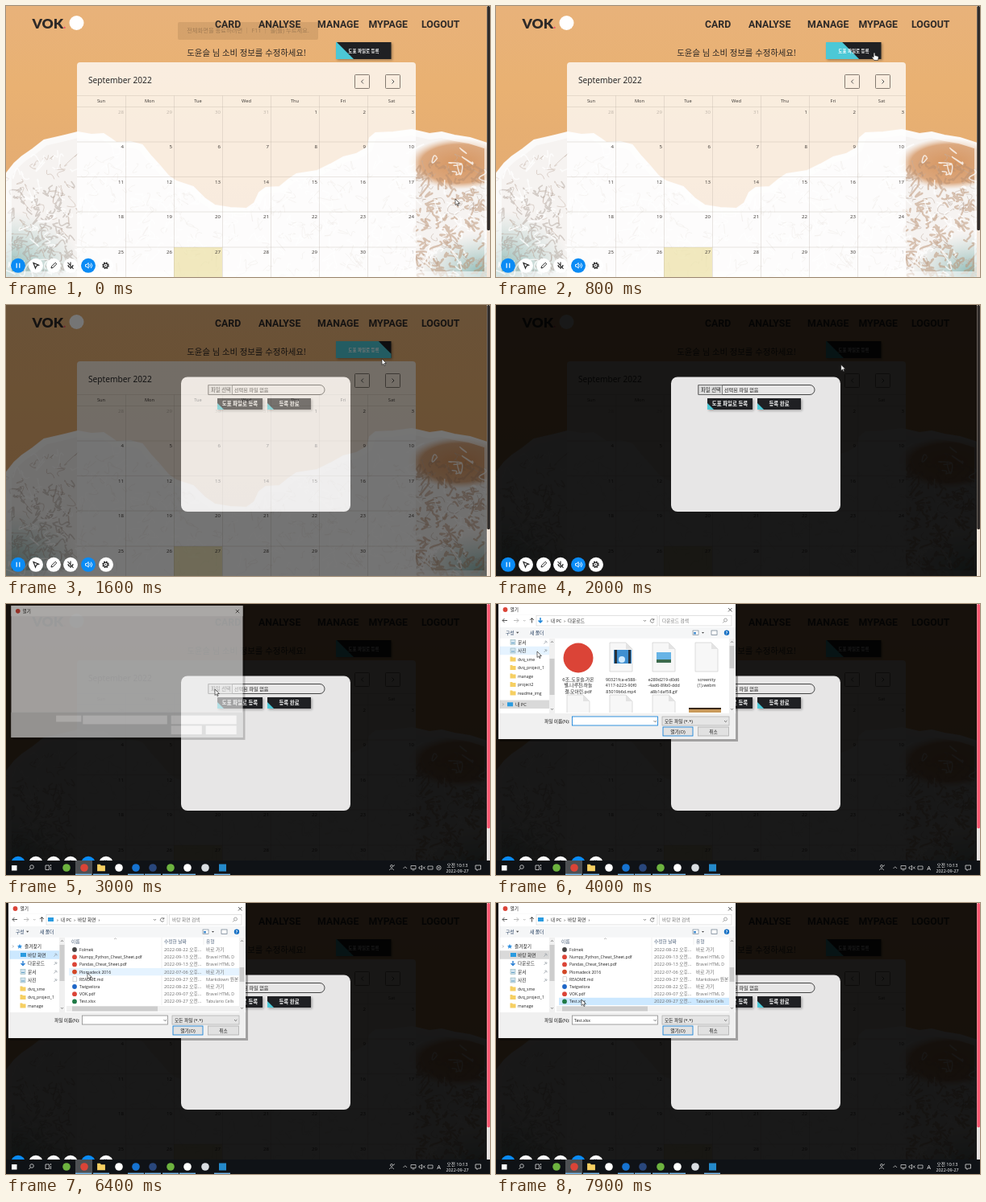
Write an HTML page that moves like this. It is 600 by 337 pixels and loops after 8000 ms.

```html
<!DOCTYPE html>
<html>
<head>
<meta charset="utf-8">
<style>
html, body { margin: 0; width: 100%; height: 100%; overflow: hidden; background: #e8b377; }
svg { display: block; width: 100vw; height: 100vh; font-family: 'Open Sans', 'Noto Sans CJK KR', 'Noto Sans CJK', sans-serif; }
text { white-space: pre; }
.nav { font-family: Roboto, sans-serif; font-weight: 700; font-size: 12.3px; }
.cal { font-family: 'Noto Sans', sans-serif; }
</style>
</head>
<body>
<svg id="stage" viewBox="0 0 600 337" preserveAspectRatio="none"></svg>
<script>
const LOOP = 8000;
const stage = document.getElementById('stage');
const $ = id => document.getElementById(id);

const rect = (x, y, w, h, fill, extra = '') =>
  `<rect x="${x}" y="${y}" width="${w}" height="${h}" fill="${fill}" ${extra}/>`;
const disc = (x, y, r, fill, extra = '') => `<circle cx="${x}" cy="${y}" r="${r}" fill="${fill}" ${extra}/>`;
const line = (d, stroke = '#444', w = .8, extra = '') =>
  `<path d="${d}" fill="none" stroke="${stroke}" stroke-width="${w}" ${extra}/>`;
const text = (x, y, s, size, fill = '#222', extra = '') =>
  `<text x="${x}" y="${y}" font-size="${size}" fill="${fill}" ${extra}>${s}</text>`;
const label = (x, y, s, fill = '#222', extra = '') =>
  text(x, y, s, /[가-힣]/.test(s) ? 5.7 : 5.1, fill, extra);
const mid = 'text-anchor="middle"';
const bold = 'text-anchor="middle" font-weight="700"';
const range = n => [...Array(n).keys()];

// ---------- beach and page ----------
let seed = 7;
const rnd = () => (seed = seed * 16807 % 2147483647) / 2147483647;
const spread = size => ((rnd() - .5) * size).toFixed(1);

// wavy strokes scattered over a region
const ripples = (n, x, y, w, h, size) => range(n).map(() =>
  `M${(x + rnd() * w).toFixed(1)} ${(y + rnd() * h).toFixed(1)}q${spread(size)} ${spread(size)} ${spread(size)} ${spread(size)}t${spread(size)} ${spread(size)}`).join('');

function beach() {
  const foam = 'M0 209L10 196L20 187L33 178L47 167L60 164L73 161L89 157L106 160L121 159L130 165L137 170L154 169L169 173L180 187L190 198' +
    'L201 211L211 218L232 225L246 239L259 248L278 251L298 252L308 245L314 232L322 226L339 225L350 216L360 209L386 205L402 197L418 188' +
    'L434 184L448 176L451 164L458 158L480 157L503 154L525 159L540 157L556 161L575 164L600 172V337H0Z';
  return `<defs>
    <linearGradient id="sand" x2="0" y2="1"><stop stop-color="#e8b27a"/><stop offset=".3" stop-color="#e9b172"/><stop offset="1" stop-color="#dfa772"/></linearGradient>
    <radialGradient id="teal"><stop stop-color="#6fa9a4"/><stop offset="1" stop-color="#a9c8c4" stop-opacity="0"/></radialGradient>
    <radialGradient id="wet"><stop stop-color="#d6955f"/><stop offset=".75" stop-color="#d9a072" stop-opacity=".9"/><stop offset="1" stop-color="#e6c0a0" stop-opacity="0"/></radialGradient>
    <filter id="soft" x="-20%" y="-50%" width="140%" height="200%"><feGaussianBlur stdDeviation="1.6"/></filter>
    <clipPath id="foamClip"><path d="${foam}"/></clipPath></defs>
    ${rect(0, 0, 600, 337, 'url(#sand)')}
    <path d="${foam}" fill="#f6f3f1" stroke="#fbf6f2" stroke-width="2" stroke-linejoin="round"/>
    <g clip-path="url(#foamClip)" stroke-linecap="round">
      <ellipse cx="562" cy="196" rx="64" ry="32" fill="url(#wet)"/>
      <ellipse cx="4" cy="330" rx="90" ry="75" fill="url(#teal)" opacity=".8"/>
      <ellipse cx="590" cy="332" rx="75" ry="50" fill="url(#teal)" opacity=".8"/>
      ${line(ripples(330, 0, 190, 600, 147, 16), '#bfae a2'.replace(' ', ''), 1, 'opacity=".5"')}
      ${line(ripples(130, 508, 200, 92, 137, 13), '#b98f70', 2.2, 'opacity=".5"')}
      ${line(ripples(90, 0, 225, 88, 112, 13), '#a99c92', 1.6, 'opacity=".45"')}
      ${line(ripples(260, 0, 180, 600, 157, 18), '#fff', 1.5, 'opacity=".75"')}
      ${line(foam, '#fff', 14, 'opacity=".6"')}
    </g>`;
}

function calendar() {
  const days = ['Sun', 'Mon', 'Tue', 'Wed', 'Thu', 'Fri', 'Sat'];
  const rows = [125.5, 169, 212.5, 256, 300];
  const grid = range(6).map(i => `M${148.5 + i * 60} 111.5V337`).join('') +
    [111.5, ...rows].map(y => `M88 ${y}H508`).join('');
  const cells = range(35).map(i => {
    const n = i - 3, out = n < 1 || n > 30;
    const s = n < 1 ? n + 31 : n > 30 ? n - 30 : n;
    return text(146 + i % 7 * 60, rows[i / 7 | 0] + 8, s, 6.1, '#443f3b', `text-anchor="end" opacity="${out ? .3 : 1}"`);
  }).join('');
  return `<g class="cal">${rect(88, 70, 420, 280, '#fff', 'opacity=".77" rx="4"')}
    ${rect(208, 300, 60, 37, '#eadd96', 'opacity=".6"')}
    ${line(grid, '#a99c8f', .7, 'opacity=".35"')}
    ${text(102, 95.8, 'September 2022', 10.2, '#2b2b2b')}
    ${days.map((d, i) => text(118 + i * 60, 119.8, d, 5.7, '#443f3b', mid)).join('')}${cells}
    ${[432.5, 470.5].map(x => rect(x, 85.5, 18, 17, 'none', 'rx="1" stroke="#665d55" stroke-width=".8"')).join('')}
    ${line('M443 91.5l-2.500 2.500l2.500 2.500M478.500 91.500l2.500 2.500l-2.500 2.500', '#444', .9)}</g>`;
}

const slash = (x, y, w, h, k) => { // region left of a 45 degree edge
  const p = [[x, y + Math.max(0, -k)]];
  if (k > 0) p.push([x + Math.min(k, w), y]);
  if (k > w) p.push([x + w, y + h]);
  else if (k + h > w) p.push([x + w, y + w - k], [x + w, y + h]);
  else p.push([x + k + h, y + h]);
  return 'M' + p.map(q => q.join(' ')).join('L') + `L${x} ${y + h}Z`;
};
const shadow = (x, y, w, h) => rect(x + 1.5, y + 1.5, w, h, '#000', 'opacity=".3" filter="url(#soft)"');

const page = `${beach()}
  <text x="32.500" y="28" font-size="17.500" font-weight="900" font-family="Lato, sans-serif" fill="#2e2a28">VOK<tspan fill="#f0506a" font-size="13">.</tspan></text>
  ${disc(87.5, 21, 9, '#fff')}
  ${[['CARD', 259], ['ANALYSE', 313], ['MANAGE', 386], ['MYPAGE', 449.5], ['LOGOUT', 515]]
    .map(([s, x]) => `<text class="nav" x="${x}" y="26.8" fill="#2e2a28">${s}</text>`).join('')}
  ${text(298, 62, '도윤슬 님 소비 정보를 수정하세요!', 10.4, '#2b2623', mid)}
  ${shadow(409, 45, 68.5, 21)}${rect(409, 45, 68.5, 21, '#1f2023')}
  <path id="hoverFill" fill="#4cc8d6"/>${text(443.5, 57.5, '도표 파일로 등록', 5.5, '#fff', bold)}
  ${calendar()}`;

const modalButton = (x, w, s) => `${shadow(x, 116, w, 14)}${rect(x, 116, w, 14, '#1f2023')}
  <path d="${slash(x, 116, w, 14, -6)}" fill="#4cc8d6"/>${text(x + w / 2, 125.3, s, 6.4, '#fff', bold)}`;

const modal = `${rect(0, 0, 600, 337, '#000', 'opacity=".9"')}
  ${rect(217, 89.5, 210, 167.5, '#e7e6e6', 'rx="8"')}
  <path d="M251 99.5H389a6 6 0 0 1 0 12H251Z" fill="#e7e6e6" stroke="#333" stroke-width=".9"/>
  ${rect(251, 99.5, 29.5, 12, '#dcdcdc', 'stroke="#555" stroke-width=".7"')}
  ${text(254, 107.7, '파일 선택', 6.3)}${text(283, 107.7, '선택된 파일 없음', 6.1)}
  ${modalButton(262, 56, '도표 파일로 등록')}${modalButton(324, 54, '등록 완료')}`;

// ---------- recorder toolbar, taskbar ----------
const tools = [15, 37, 59, 80, 102, 124].map((x, i) => disc(x, 322.8, 9, i % 4 ? '#fff' : '#0a8bf5')).join('') +
  line('M13.2 319.8v6M16.8 319.8v6', '#fff', 1.2) +
  `<path d="M34 319.5l6.5 2.6l-2.8 1l-1.2 3Z" fill="none" stroke="#222" stroke-width="1.2"/>` +
  line('M56 326l.6-2.2l4.6-4.6l1.6 1.6l-4.6 4.6Z', '#222', 1) +
  line('M80 318.5v4M77 322q0 3 3 3t3-3M80 325v2M76.5 319l7 8', '#222', 1.1) +
  line('M98.5 321.5h1.5l2.2-2v6.6l-2.2-2h-1.5ZM103.8 321q1.6 1.8 0 3.6M105.3 319.6q3 3.2 0 6.4', '#fff', .9) +
  disc(123.5, 322.8, 3.6, 'none', 'stroke="#222" stroke-width="1.4" stroke-dasharray="1.7 1.13"') +
  disc(123.5, 322.8, 2.6, 'none', 'stroke="#222" stroke-width="1.1"') + disc(123.5, 322.8, .8, '#222');

const folder = (x, y, k = 1) => `<path transform="translate(${x} ${y}) scale(${k})" d="M-3.5-3h2.6l.8 1h3.6v5h-7Z" fill="#f6cf62"/>`;
const apps = [[75, '#6db33f'], [97, '#db4437'], [140, '#fff'], [161, '#1673d1'], [182, '#29477c'], [204, '#6db33f'], [225, '#fff'], [247, '#d8dde2']];
const taskbar = rect(0, 319, 600, 18, '#0f1216') + rect(86, 319, 21, 18, '#4d5053') +
  rect(7, 325, 6.5, 6.5, '#fff') + disc(32, 327, 2.3, 'none', 'stroke="#ddd" stroke-width=".8"') + line('M30.4 328.8l-2 2.2', '#ddd') +
  line('M49 325h4.5v5.5h-4.5ZM55.5 324v2M55.5 327v4', '#ddd') +
  apps.map(([x, c]) => disc(x, 328, 4.8, c)).join('') + folder(118, 328, 1.4) + rect(264, 323.5, 9, 9, '#2489ca') +
  [86, 108, 151, 172, 194, 215, 258].map(x => rect(x, 335.6, 20, 1.4, '#76b9ed')).join('') +
  disc(478, 326, 1.5, 'none', 'stroke="#ddd" stroke-width=".7"') + line('M475 331q3-4 6 0M480 326l2-1.5', '#ddd', .7) +
  line('M492.5 329l2.3-2.3l2.3 2.3M502 325.5h6v4h-6ZM503.5 331h3M512 327h1.5l2-2v6l-2-2h-1.5ZM517 326.5l2.5 3M519.5 326.5l-2.5 3M523 326h6v4h-6Z', '#ddd', .7) +
  `<g id="offline">${disc(536.5, 328, 2.7, 'none', 'stroke="#ddd" stroke-width=".7"')}${line('M535 326.5l3 3M538 326.5l-3 3', '#ddd', .7)}</g>` +
  text(536.5, 330.7, 'A', 7.5, '#eee', mid + ' id="ime"') +
  text(559.5, 326.5, '오전 10:13', 5.6, '#fff', mid) + text(559.5, 334.3, '2022-09-27', 5.4, '#fff', mid) +
  line('M582 325h6.5v5h-3l-1.5 1.5v-1.5h-2Z', '#ddd', .8);

// ---------- file dialog ----------
const ROW = 9.2, NAV = 10.5;
const places = ['즐겨찾기', '바탕 화면', '다운로드', '문서', '사진', 'dvq_sme', 'dvq_project_1', 'manage', 'project2', 'readme_img', '내 PC'];
const placeY = i => 54 + NAV * i + (i === 10 ? 3.8 : 0);
const placeIcon = (i, y) =>
  i === 0 ? `<path d="M17 ${y - 3}l1 2h2l-1.5 1.5l.6 2.2l-2.1-1.2l-2.1 1.2l.6-2.2l-1.5-1.5h2Z" fill="#2f8fe0"/>`
  : i === 1 || i === 10 ? rect(i === 10 ? 14 : 18, y - 2.5, 7, 5, '#2a9be0')
  : i === 2 ? line(`M21 ${y - 3}v5M18.5 ${y}l2.5 2.5l2.5-2.5`, '#2a7fd4', 1.4)
  : i < 5 ? rect(18, y - 3, 6, 6, '#cfe3ef', 'stroke="#8aa" stroke-width=".5"') + line(`M19 ${y + 1}h4`, '#4a8db5')
  : folder(21, y);
const navList = places.map((s, i) => {
  const y = placeY(i), x = i === 0 ? 23 : i === 10 ? 24 : 27;
  const pin = i > 0 && i < 5 ? line(`M59.5 ${y + 2}l2-2M60.5 ${y - 1.5}l2.5 2.5M61.5 ${y - 2}l2 2`, '#8a939b', .7) : '';
  const arrow = i % 10 === 0 ? line(`M8 ${y - 1.5}l1.5 1.5l-1.5 1.5`, '#777', .6) : '';
  return placeIcon(i, y) + label(x, y + 2, s) + pin + arrow;
}).join('');

const SHORTCUT = '바로 가기', WEB = 'Bravel HTML D';
const files = [
  ['dvq_project_1', '09-22 오후', '파일 폴더'], ['manage', '09-22 오후', '파일 폴더'],
  ['project2', '09-22 오전', '파일 폴더'], ['readme_img', '09-22 오전', '파일 폴더'],
  ['Folmek', '08-22 오후', SHORTCUT, '#444'], ['Numpy_Python_Cheat_Sheet.pdf', '09-13 오전', WEB, '#db4437'],
  ['Pandas_Cheat_Sheet.pdf', '09-13 오전', WEB, '#db4437'], ['Plomadeck 2016', '07-06 오후', SHORTCUT, '#d24726'],
  ['README.md', '09-27 오전', 'Markdown 원본'], ['Twigvelora', '08-22 오후', SHORTCUT, '#1f66c7'],
  ['VOK.pdf', '09-07 오후', WEB, '#db4437'], ['Test.xlsx', '09-27 오전', 'Tabulario Cells', '#1f7a46']];
const HIDDEN = 4;
const rowY = i => 58 + ROW * (i - HIDDEN);
const fileList = files.map(([name, date, kind, c], i) => {
  const y = rowY(i);
  const icon = c ? disc(85, y, 2.9, c) : i < HIDDEN ? folder(85, y) : rect(83, y - 3, 4.5, 6, '#fff', 'stroke="#aaa" stroke-width=".5"');
  return icon + label(91, y + 2, name) + label(196, y + 2, `2022-${date}...`, '#6d6d6d') + label(248, y + 2, kind, '#6d6d6d');
}).join('');

const sheet = (x, y) => `<path d="M${x - 14} ${y}h20l8 8v28h-28Z" fill="#f7f7f7" stroke="#cfcfcf" stroke-width=".7"/>` +
  `<path d="M${x + 6} ${y}v8h8Z" fill="#e3e3e3"/>`;
const captions = [['6조_도윤슬,가온', '별,나루찬,하늘', '결,모아린.pdf'], ['90321fca-e588-', '4117-b223-90f0', '85019b6d.mp4'],
  ['e289d219-d0d6', '-4ad6-89b0-ddd', 'a8b1daf58.gif'], ['screenity', '(1).webm']];
const thumbs = disc(102, 67, 18.5, '#db4437') + [155, 208, 261].map(x => sheet(x, 48)).join('') +
  [102, 155, 208].map(x => sheet(x, 113)).join('') + rect(239, 129, 40, 9, '#c99a5b') + rect(239, 129, 40, 2, '#3a2a1c') +
  rect(146, 57, 22, 17, '#3f8fd0') + rect(147, 57, 3, 17, '#26313c') + rect(164, 57, 3, 17, '#26313c') + disc(156, 69, 4, '#cfeaff') +
  rect(199, 60, 18, 13, '#67b4e6') + rect(199, 69, 18, 4, '#3c6b4e') +
  captions.map((ls, c) => ls.map((s, i) => text(102 + c * 53, 95.5 + i * 7.8, s, /[가-힣]/.test(s) ? 5.8 : 5.3, '#222', mid)).join('')).join('');

const push = (x, w, s, edge) => rect(x, 153, w, 11, '#e1e1e1', `stroke="${edge}" stroke-width=".8"`) + label(x + w / 2, 160.5, s, '#111', mid);
const vbar = (x, h, id) => rect(x, 43, 7, h, '#f0f0f0') + rect(x + .5, 52, 6, 45, '#cdcdcd', `id="${id}"`) +
  line(`M${x + 2} 48l1.5-1.5l1.5 1.5M${x + 2} ${41 + h - 4}l1.5 1.5l1.5-1.5`, '#555', .7);

const dialog = `<clipPath id="navClip">${rect(3, 43, 63, 92, '#000')}</clipPath>
  <clipPath id="listClip">${rect(75, 53, 214, 74, '#000')}</clipPath><clipPath id="thumbClip">${rect(75, 43, 214, 92, '#000')}</clipPath>
  ${rect(5, 3, 295, 168, '#000', 'opacity=".3"')}${rect(3, 0, 294, 168, '#f0f0f0')}${rect(3, 0, 294, 13.5, '#fff')}
  ${disc(11.5, 7, 2.9, '#db4437')}${label(17.5, 9.3, '열기')}${line('M288 5l4.5 4.5M292.5 5l-4.5 4.5', '#222', .7)}
  <g id="blank">${rect(3, 136, 294, 32, '#dcdcdc')}${rect(60, 140, 32, 8, '#fff')}${rect(94, 140, 107, 11, '#fff')}${rect(206, 140, 83, 11, '#fff')}
    ${rect(206, 153, 39, 11, '#fff')}${rect(250, 153, 39, 11, '#fff')}</g>
  <g id="dialogBody">${rect(3, 13.5, 294, 15.5, '#fff')}${rect(3, 29, 294, 13.5, '#f5f6f7')}${rect(3, 42.5, 294, 93.5, '#fff')}
    ${rect(94.5, 140, 106, 11, '#fff', 'id="nameBox" stroke-width=".8"')}${rect(206, 140, 83, 11, '#e5e5e5', 'stroke="#aaa" stroke-width=".7"')}
    ${line('M14 20.5h-6m2.5-2.5l-2.5 2.5l2.5 2.5M44.5 23.5v-6m-2.5 2.5l2.5-2.5l2.5 2.5', '#444', .9)}
    ${line('M22 20.5h6m-2.5-2.5l2.5 2.5l-2.5 2.5M34 20l1.3 1.3l1.3-1.3', '#aaa', .8)}
    ${rect(50, 14.5, 150, 12.5, '#fff', 'stroke="#d6d6d6" stroke-width=".7"')}${rect(202.5, 14.5, 89.5, 12.5, '#fff', 'stroke="#d6d6d6" stroke-width=".7"')}
    ${line('M183 20l1.5 1.5l1.5-1.5M195.5 19.5a2.3 2.3 0 1 0 .3 2.3M195.8 18v2h-2', '#555', .7)}
    <g id="pathDown">${line('M55 17v5M52.5 20.5l2.5 2.5l2.5-2.5', '#1f86d8', 1.5)}${label(63, 22.8, '›  내 PC  ›  다운로드')}${label(206, 22.8, '다운로드 검색', '#777')}</g>
    <g id="pathDesk">${rect(52, 18, 7, 5, '#2a9be0')}${label(63, 22.8, '›  내 PC  ›  바탕 화면  ›')}${label(206, 22.8, '바탕 화면 검색', '#777')}</g>
    ${disc(284.5, 20, 2, 'none', 'stroke="#888" stroke-width=".7"')}${line('M283 21.5l-1.8 2', '#888')}
    ${label(12, 38, '구성', '#1e395b')}<path d="M25 34.8h3.4l-1.7 2Z" fill="#444"/>${label(42, 38, '새 폴더', '#1e395b')}
    ${rect(244, 33, 7, 5.5, '#fff', 'stroke="#678" stroke-width=".6"')}${rect(245, 35, 3, 2.5, '#4a90d0')}<path d="M255 35h3l-1.5 1.8Z" fill="#444"/>
    ${rect(267, 33, 7, 5.5, '#fff', 'stroke="#678" stroke-width=".7"')}${disc(286, 35.7, 3.2, '#1670c4')}${text(286, 37.7, '?', 5, '#fff', bold)}
    <g clip-path="url(#navClip)"><g id="nav">${rect(4, 0, 62, NAV, '#e5f3ff', 'id="navHover"')}${rect(4, 0, 62, NAV, '#d9d9d9', 'id="navSel"')}${navList}</g></g>
    ${vbar(66, 93, 'navThumb')}
    <g id="downloads" clip-path="url(#thumbClip)">${thumbs}</g>
    <g id="desktop">${label(81, 49.5, '이름', '#4c607a')}${label(196, 49.5, '수정한 날짜', '#4c607a')}${label(248, 49.5, '유형', '#4c607a')}
      ${line('M193 43v84M245 43v9', '#e5e5e5', .6)}${line('M134 45l1.5-1.2l1.5 1.2', '#777', .5)}
      <g clip-path="url(#listClip)"><g id="list">${rect(78, 0, 214, ROW, '#e5f3ff', 'id="rowMark"')}${fileList}</g></g>
      ${rect(75, 128, 214, 7, '#f0f0f0')}${rect(82, 128.5, 106, 6, '#cdcdcd')}</g>
    ${vbar(289, 93, 'listThumb')}
    ${label(91.5, 147.5, '파일 이름(N):', '#111', 'text-anchor="end"')}${label(97, 147.5, 'Test.xlsx', '#111', 'id="fileName"')}
    ${label(209, 147.5, '모든 파일 (*.*)', '#111')}${line('M195.5 145l1.7 1.7l1.7-1.7M283 145l1.7 1.7l1.7-1.7', '#444', .7)}
    ${push(207, 37, '열기(O)', '#0078d7')}${push(250.5, 38, '취소', '#adadad')}</g>`;

const toast = rect(213, 20, 174, 22, '#3b2a18', 'opacity=".11" rx="2"') +
  text(300, 33, '전체화면을 종료하려면 │ F11 │ 을(를) 누르세요.', 7.3, '#5a4630', mid + ' opacity=".4"');

stage.innerHTML = `${page}<g id="modal">${modal}</g><g id="toast">${toast}</g>${tools}
  ${rect(596, 0, 4, 337, '#f3e6da', 'id="track"')}${rect(596.3, 0, 3.7, 279, '#2f2b29', 'id="scroll" rx="1.5"')}
  <g id="taskbar">${taskbar}</g><g id="dialog">${dialog}</g>
  <g id="cursor" fill="#fff" stroke="#111" stroke-width=".6">
    <path id="arrow" d="M0 0V7.5L1.8 5.9L3 8.6L4.2 8L3 5.5H5.4Z"/>
    <path id="hand" d="M-.9.6q.9-1.2 1.8 0v3l3.4.8q1 .3.9 1.5l-.7 3.6h-4.7l-2.7-3.6q-.2-1.2 1-.9l1 .8Z"/></g>`;

// ---------- motion ----------
const ramp = (t, a, b) => Math.min(1, Math.max(0, (t - a) / (b - a)));
const ease = u => u * u * (3 - 2 * u);
function track(t, keys, curve = ease) {
  let i = 0;
  while (i < keys.length - 2 && t >= keys[i + 1][0]) i++;
  const [a, b] = [keys[i], keys[i + 1]], u = curve(ramp(t, a[0], b[0]));
  return a.slice(1).map((v, j) => v + (b[j + 1] - v) * u);
}
const path = [[0, 557, 240], [700, 469, 58], [1100, 469, 58], [1500, 466, 67], [1850, 466, 67], [2400, 259, 106], [3400, 259, 106],
  [3900, 51, 59], [4250, 51, 59], [4550, 36, 65], [4900, 36, 65], [5300, 140, 88], [5900, 140, 88], [6350, 101, 87], [6800, 101, 87], [7250, 106, 120], [8000, 106, 120]];
const hover = [[0, 1], [650, 1], [800, 20], [1050, 70], [1500, 70], [1600, 53], [1850, 1], [8000, 1]];
const set = (id, attrs) => { for (const k in attrs) $(id).setAttribute(k, attrs[k]); };
const show = (id, on) => set(id, { display: on ? 'inline' : 'none' });

function update(t) {
  const [cx, cy] = track(t, path);
  const onButton = t < 1350 && cx > 409 && cx < 477 && cy > 45 && cy < 66;
  set('cursor', { transform: `translate(${cx} ${cy})` });
  show('arrow', !onButton);
  show('hand', onButton);
  set('hoverFill', { d: slash(409, 45, 68.5, 21, track(t, hover, u => u)[0]) });
  set('toast', { opacity: 1 - ramp(t, 0, 300) });
  set('modal', { opacity: ramp(t, 1350, 1767) });

  const unfocused = t >= 2800;
  set('scroll', { fill: unfocused ? '#fb5a73' : '#2f2b29' });
  set('track', { fill: unfocused ? '#e9e4e2' : '#f3e6da' });
  show('taskbar', unfocused);
  show('offline', t < 3200);
  show('ime', t >= 3200);

  const open = ramp(t, 2880, 3070), k = .935 + .065 * open;
  set('dialog', { opacity: open, transform: `translate(150 84) scale(${k}) translate(-150 -84)` });
  show('blank', t < 3150);
  show('dialogBody', t >= 3150);

  const desk = t >= 4750, picked = t >= 7400;
  for (const id of ['pathDesk', 'desktop']) show(id, desk);
  for (const id of ['pathDown', 'downloads']) show(id, !desk);
  const shift = 38 * (1 - ramp(t, 4150, 4350));
  set('nav', { transform: `translate(0 ${-shift})` });
  set('navThumb', { y: 52 + shift * .42 });
  set('navSel', { y: placeY(desk ? 1 : 10) - NAV / 2, fill: desk && !picked ? '#cce8ff' : '#d9d9d9' });
  set('navHover', { y: placeY(Math.round((cy - 54 + shift) / NAV)) - NAV / 2 });
  show('navHover', cx < 66 && cy > 48);

  const scroll = HIDDEN * (1 - ramp(t, 5400, 5900));
  const row = picked ? files.length - 1 : Math.round((cy - 57) / ROW - scroll) + HIDDEN;
  set('list', { transform: `translate(0 ${scroll * ROW})` });
  set('listThumb', { y: desk ? 80 - scroll * 7 : 52, height: desk ? 18 : 28 });
  set('rowMark', { y: rowY(row) - ROW / 2, fill: picked ? '#cce8ff' : '#e5f3ff' });
  show('rowMark', picked || cx > 78);
  show('fileName', picked);
  set('nameBox', { stroke: desk ? '#8a8a8a' : '#0078d7' });
}

const start = performance.now();
function frame() {
  update((performance.now() - start) % LOOP);
  requestAnimationFrame(frame);
}
update(0);
requestAnimationFrame(frame);
</script>
</body>
</html>
```
